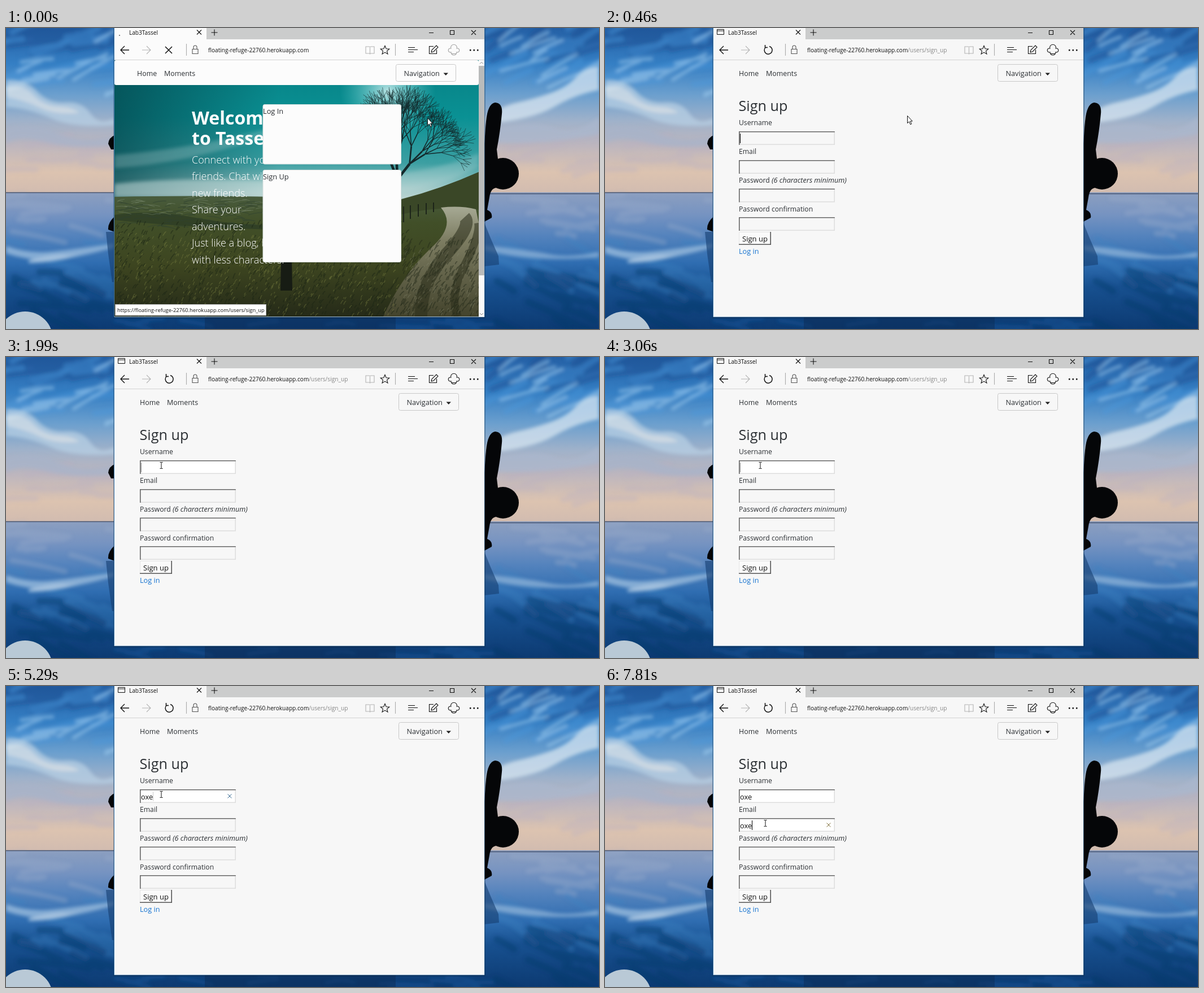
Recreate the animation shown at these times as an HTML page. Size 1050 px wide and 533 px high, loop 8 s.

```html
<!DOCTYPE html>
<html lang="en">
<head>
<meta charset="utf-8">
<title>Sign up</title>
<style>
html, body { margin: 0; width: 100%; height: 100%; overflow: hidden; }
svg { display: block; width: 100vw; height: 100vh; }
text { font-family: 'Open Sans', 'Noto Sans', sans-serif; font-size: 12.5px; fill: #2b2f33; white-space: pre; }
.line { fill: none; }
.small { font-size: 10.1px; fill: #111; }
.intro { font-size: 18.1px; font-weight: 350; fill: #fff; }
.title { font-size: 32px; font-weight: 700; fill: #fff; }
.label { font-size: 12.2px; }
.panel { font-size: 12.8px; }
.value { font-size: 12.8px; fill: #111; }
</style>
</head>
<body>
<svg viewBox="0 0 1050 533" preserveAspectRatio="none">
  <defs>
    <linearGradient id="wall" x2="0" y2="1">
      <stop offset="0" stop-color="#2560a5"/><stop offset=".12" stop-color="#357fc4"/>
      <stop offset=".22" stop-color="#6b9fce"/><stop offset=".31" stop-color="#a0b2ca"/>
      <stop offset=".39" stop-color="#bdb6be"/><stop offset=".48" stop-color="#dcc3b0"/>
      <stop offset=".545" stop-color="#d2bcb0"/><stop offset=".546" stop-color="#8c9fc0"/>
      <stop offset=".62" stop-color="#7693c1"/><stop offset=".69" stop-color="#5483bd"/>
      <stop offset=".78" stop-color="#2f6db1"/><stop offset=".86" stop-color="#17508f"/>
      <stop offset="1" stop-color="#0c3a72"/>
    </linearGradient>
    <linearGradient id="sky" x2="0" y2="1">
      <stop offset="0" stop-color="#078084"/><stop offset=".4" stop-color="#0a9194"/>
      <stop offset=".72" stop-color="#3c9fa2"/><stop offset=".9" stop-color="#a3cac9"/>
      <stop offset="1" stop-color="#c6d9d6"/>
    </linearGradient>
    <linearGradient id="shade">
      <stop offset="0" stop-color="#04454c" stop-opacity=".75"/><stop offset=".45" stop-color="#04454c" stop-opacity="0"/>
    </linearGradient>
    <radialGradient id="sun">
      <stop offset="0" stop-color="#eff" stop-opacity=".75"/><stop offset="1" stop-color="#7dd" stop-opacity="0"/>
    </radialGradient>
    <linearGradient id="land" x2="0" y2="1">
      <stop offset="0" stop-color="#5c7a72"/><stop offset=".12" stop-color="#4b5f42"/>
      <stop offset=".35" stop-color="#414f28"/><stop offset=".65" stop-color="#3d4520"/>
      <stop offset="1" stop-color="#252a18"/>
    </linearGradient>
    <linearGradient id="road" x2="0" y2="1">
      <stop offset="0" stop-color="#a6a994"/><stop offset=".3" stop-color="#7d7d62"/>
      <stop offset="1" stop-color="#43432c"/>
    </linearGradient>
    <filter id="soft" x="-20%" y="-20%" width="140%" height="140%"><feGaussianBlur stdDeviation="3"/></filter>
    <clipPath id="photo"><path d="M192 57H837V511H192Z"/></clipPath>
  </defs>

  <!-- wallpaper -->
  <path fill="url(#wall)" d="M0 0H1050V533H0Z"/>
  <g id="paint" filter="url(#soft)"></g>
  <g filter="url(#soft)" opacity=".75">
    <path fill="#b7cfe3" d="M0 92Q35 90 55 112T105 132T150 152T192 160V172Q120 178 80 160T0 140Z"/>
    <path fill="#e2e7ea" d="M0 104Q30 98 48 118T92 139T130 150Q90 155 60 141T0 122Z"/>
    <path fill="#a7b3c9" d="M0 178Q50 165 90 185T192 192V208Q120 215 70 202T0 205Z"/>
    <path fill="#9fc0df" d="M0 386Q40 400 80 396T192 382V388Q130 406 88 410T0 399Z"/>
    <path fill="#c9dcec" d="M40 412Q80 400 105 402T140 393Q120 413 40 416Z"/>
    <path fill="#d7e5f0" d="M1050 68Q1025 70 1008 88T962 116T905 132T847 160V170Q930 163 970 140T1050 110Z"/>
    <path fill="#aab7cd" d="M847 182Q930 162 970 176T1050 158V188Q960 208 847 202Z"/>
    <path fill="#8fb3d8" d="M1050 396Q1000 408 960 400T847 385V393Q930 416 1050 406Z"/>
  </g>
  <path stroke="#47556f" stroke-width="1.5" d="M0 291.5H192M847 293.5H1050"/>
  <path fill="#050608" d="M847 205L850 165Q853 134 866 132Q880 133 878 152Q875 185 869 215L872 240L868 283Q858 284 856 300L852 322Q862 326 860 336L847 343Z"/>
  <circle cx="880" cy="258" r="28" fill="#050608"/>
  <path fill="#050608" d="M192 190Q182 194 181 205L186 215H192ZM192 334Q180 345 181 357L192 361Z"/>
  <path fill="#173f70" opacity=".6" d="M847 345L858 372L872 404L873 419L847 422ZM192 361H177L181 400L188 450H192Z"/>
  <circle cx="34" cy="551" r="49" fill="#b9c9d6"/>
  <path fill="#0c2d57" opacity=".5" d="M352 512H690V533H352Z"/>

  <!-- window -->
  <path fill="#123" opacity=".3" d="M190 0H849V514H190Z"/>
  <path fill="#4680b3" d="M191 0H847.500V512H191Z"/>
  <path id="sheet" d="M192 0H847V511.500H192Z"/>
  <path fill="#cbcccc" d="M355 0H847V20H355Z"/>
  <path stroke="#d2d2d2" d="M192 56.500H847"/>
  <g class="line" stroke="#111" stroke-width="1.1">
    <path d="M338 3.500l8 8m0-8l-8 8M363.500 8h11M369 2.500v11M749 8.500h8M786.500 4.500h7v7h-7zM824 4l8 8m0-8l-8 8"/>
    <path stroke-width="1.4" d="M218 39H203m7-7l-7 7l7 7"/>
    <path stroke="#b4b4b4" d="M241 39h15m-7-7l7 7l-7 7"/>
    <path stroke="#aaa" d="M319.500 28V49M689.500 28V49"/>
    <path stroke="#555" d="M330 37.500h10v8h-10zM332 37v-3a3 3 0 0 1 6 0v3"/>
    <path stroke="#b4b4b4" d="M637 33h6q1.500 0 1.500 1.500q0-1.500 1.500-1.500h6v12h-6q-1.500 0-1.500 1.500q0-1.500-1.500-1.500h-6zM644.500 35v11"/>
    <path d="M671 31.500l2.200 5.200l5.600.4l-4.300 3.600l1.400 5.400l-4.900-3l-4.900 3l1.400-5.400l-4.300-3.600l5.600-.4z"/>
    <path d="M712 34.500h12M712 38.500h17M712 42.500h10"/>
    <path d="M757 32.500h-7.500v13h13v-7M753 43l1-4l8-8l3 3l-8 8z"/>
    <path id="share" d="M788 37a5.500 5.500 0 1 1 10 0M788 45.500h9M787 36a3.500 3.500 0 1 0 1.500 6.500M799 36a3.500 3.500 0 1 1-1.500 6.500M788 43a5 5 0 0 0 10 0"/>
  </g>
  <path fill="#111" d="M821 38h2.500v2.500H821zM827.500 38h2.500v2.500h-2.500zM834 38h2.500v2.500H834z"/>
  <text class="small" x="218" y="11.500">Lab3Tassel</text>
  <text class="small" x="358" y="42.500">floating-refuge-22760.herokuapp.com<tspan id="route" fill="#858585">/users/sign_up</tspan></text>

  <!-- landing page -->
  <g id="landing">
    <path stroke="#111" stroke-width="1.5" d="M282 33l12 12m0-12l-12 12"/>
    <g id="dots" fill="#666"></g>
    <g clip-path="url(#photo)">
      <path fill="url(#sky)" d="M192 57H837V310H192Z"/>
      <path fill="url(#shade)" d="M192 57H837V300H192Z"/>
      <g filter="url(#soft)" fill="#cfe4e1">
        <path opacity=".25" d="M192 225Q320 215 460 180V192Q320 240 192 248Z"/>
        <path opacity=".5" d="M192 276Q300 264 470 270V300H192Z"/>
        <path opacity=".25" d="M690 258Q770 250 837 222V245Q780 280 690 292Z"/>
      </g>
      <circle cx="676" cy="112" r="85" fill="url(#sun)"/>
      <path fill="url(#land)" d="M192 299Q330 296 480 299L700 303Q770 285 837 255V511H192Z"/>
      <path fill="#2c3b24" opacity=".7" d="M192 331Q260 321 330 335T470 349V357Q300 352 192 340Z"/>
      <path fill="#3a4727" d="M700 304Q770 285 837 255V322Q770 314 700 330Z"/>
      <path fill="url(#road)" d="M770 318Q805 314 832 321L837 345V511H668Q700 440 752 390Q798 350 770 318Z"/>
      <g class="line" stroke="#2a2d1a" opacity=".55">
        <path stroke-width="22" d="M812 335Q826 350 780 400T735 511"/>
        <path stroke-width="14" d="M836 345Q840 365 812 420T800 511"/>
      </g>
      <g id="grass"></g>
      <g id="tree" class="line" stroke="#14292b"></g>
      <path fill="#171c14" d="M487 410H506L507 465H486Z"/>
      <path stroke="#1c2419" stroke-width="2" d="M704 316v28M716 314v24M730 312v22M744 310v20M757 309v17"/>
    </g>
    <rect x="192" y="57" width="645" height="44" rx="3" fill="#fcfcfc"/>
    <text class="title" x="329" y="170.500">Welcome</text>
    <text class="title" x="329" y="206.500">to Tassel</text>
    <g id="intro"></g>
    <g fill="#fcfcfc" stroke="#d8e0df">
      <rect x="455" y="135.500" width="244.500" height="105.500" rx="3"/>
      <rect x="455" y="251.500" width="244.500" height="163" rx="3"/>
    </g>
    <text class="panel" x="455" y="151.500">Log In</text>
    <text class="panel" x="455" y="268">Sign Up</text>
    <path fill="#fafafa" d="M837 57H847V511.500H837Z"/>
    <path fill="#b9bbbb" d="M837 67H847V438H837Z"/>
    <path class="line" stroke="#888" d="M839 63.500l3-3l3 3M839 505l3 3l3-3"/>
    <g id="status">
      <rect x="193.500" y="489.500" width="267" height="19.500" fill="#fff" stroke="#aaa"/>
      <text style="font-size:9.35px;fill:#111" x="197" y="503">https://floating-refuge-22760.herokuapp.com/users/sign_up</text>
    </g>
  </g>

  <!-- form page -->
  <g id="form">
    <path class="line" stroke="#111" d="M198.500 2.500h12v9h-12zM198.500 5h12"/>
    <path class="line" stroke="#111" stroke-width="1.5" d="M284.500 34A7 7 0 1 0 291 32.500M283.500 30v4.500h4.500"/>
    <text style="font-size:25.2px" x="236.500" y="146.500">Sign up</text>
    <text class="label" x="237" y="172">Username</text>
    <text class="label" x="237" y="223">Email</text>
    <text class="label" x="237" y="273.500">Password</text>
    <text style="font-size:12.6px;font-style:italic" x="295" y="273.500">(6 characters minimum)</text>
    <text class="label" x="237" y="324.500">Password confirmation</text>
    <g id="fields"></g>
    <path fill="#fafafa" d="M237 361H294V384H237Z"/>
    <path class="line" stroke="#e6e6e6" d="M237.500 384V361.500H293"/>
    <path class="line" stroke="#555" stroke-width="1.6" d="M237 383.200H293.200V361"/>
    <text style="font-size:13px;fill:#111" x="243" y="378">Sign up</text>
    <text style="font-size:12.7px;fill:#1673d0" x="237" y="400">Log in</text>
    <path id="clear" d="M-3.500-3.500l7 7m0-7l-7 7"/>
    <path id="caret" stroke="#000" d="M.5 0v17"/>
  </g>

  <g id="menu">
    <text style="font-size:12.4px" x="232" y="84.500">Home</text>
    <text style="font-size:12.4px" x="280" y="84.500">Moments</text>
    <rect x="690.500" y="64.500" width="106" height="30" rx="3" fill="none" stroke="#c8c8c8"/>
    <text style="font-size:12.7px" x="704.500" y="85">Navigation</text>
    <path fill="#222" d="M774.500 79.500h8.500l-4.250 4.500z"/>
  </g>
  <path id="arrow" fill="#fff" stroke="#111" d="M.5.5V13.500L3.500 10.800L5.700 15.800L7.800 14.900L5.600 10H9.300Z"/>
  <path id="beam" class="line" stroke="#111" d="M-2.500-5.500h2l.5.500l.500-.5h2M0-5v10M-2.500 5.500h2l.5-.5l.5.500h2"/>
</svg>
<script>
const $ = id => document.getElementById(id);
const LOOP = 8000, USER = 'oxe';
let seed = 7;
const rnd = () => (seed = seed * 16807 % 2147483647) / 2147483647;

// Scatter short brush strokes of one colour over a box
function strokes(id, color, n, [x, y, w, h], len, angle, width, opacity) {
  let d = '';
  while (n--) {
    const a = angle + (rnd() - .5) * .5, l = len * (.4 + rnd());
    d += `M${x + rnd() * w} ${y + rnd() * h}q${l * .5 * Math.cos(a)} ${l * .5 * Math.sin(a) - 2} ${l * Math.cos(a)} ${l * Math.sin(a)}`;
  }
  $(id).innerHTML += `<path d="${d}" fill="none" stroke="${color}" stroke-width="${width}" stroke-linecap="round" opacity="${opacity}"/>`;
}

for (const [x, tilt] of [[-20, -.3], [835, -.45]]) {
  const band = (color, n, y, h, angle, width, opacity) =>
    strokes('paint', color, n, [x, y, 200, h], 70, angle, width, opacity);
  band('#174a8c', 14, 0, 60, tilt, 11, .4);
  band('#4c98dc', 16, 0, 110, tilt, 10, .4);
  band('#a5d0f0', 12, 20, 100, tilt, 6, .5);
  band('#b9b3bf', 10, 190, 80, -.1, 10, .35);
  band('#9aabcb', 10, 300, 65, .05, 9, .35);
  band('#3b82c4', 12, 370, 90, -tilt, 10, .35);
  band('#0b3569', 14, 430, 100, -tilt, 12, .4);
}
strokes('paint', '#1d63a8', 20, [190, 512, 660, 21], 45, .1, 6, .4);

strokes('grass', '#1b2515', 700, [192, 345, 520, 165], 7, -1, 1.6, .5);
strokes('grass', '#7b8040', 600, [192, 365, 500, 146], 5, -1, 1.1, .5);
strokes('grass', '#2f4130', 110, [192, 308, 280, 45], 20, 0, 1.4, .5);
strokes('grass', '#8a9a80', 60, [192, 303, 280, 28], 18, 0, 1, .4);
strokes('grass', '#1f2717', 260, [700, 380, 137, 130], 9, -1, 1.8, .45);
strokes('grass', '#8b8c73', 120, [700, 390, 137, 120], 6, -1, 1.2, .35);

// Bare tree, one path per branching level
const LEVELS = 7, levels = Array(LEVELS).fill('');
function branch(x, y, a, len, level) {
  const x2 = x + len * Math.cos(a), y2 = y + len * Math.sin(a);
  levels[level] += `M${x} ${y}L${x2} ${y2}`;
  if (level < LEVELS - 1) for (const side of [-1, 0, 1])
    branch(x2, y2, a + side * .42 + (rnd() - .5) * .35, len * (.68 + rnd() * .24), level + 1);
}
branch(690, 312, -1.5, 44, 0);
$('tree').innerHTML = levels.map((d, i) => `<path d="${d}" stroke-width="${Math.max(.6, 8 * .58 ** i)}"/>`).join('');

$('intro').innerHTML = ['Connect with your', 'friends. Chat with', 'new friends.', 'Share your', 'adventures.',
  'Just like a blog, but', 'with less characters.']
  .map((s, i) => `<text class="intro" x="329" y="${240 + i * 29.45}">${s}</text>`).join('');

const fieldY = [183, 234, 284.5, 335];
$('fields').innerHTML = fieldY.map((y, i) => `<path id="box${i}" d="M237 ${y}h170v24h-170z"/>
  <path class="line" stroke="#dedede" stroke-width="1.6" d="M238 ${y + 23.2}h168.200v-23"/>
  <path class="line" stroke="#666" stroke-width="1.6" d="M237.800 ${y + 24}v-23.200h169"/>
  <text id="value${i}" class="value" x="239" y="${y + 17.5}"></text>`).join('');

// Step tracks: [time, ...values]
const pointer = [[0, 746, 159], [160, 712, 156], [310, 663, 153], [460, 535, 155], [610, 500, 175], [760, 440, 192],
  [910, 330, 194], [1010, 288, 193], [1160, 276, 193], [1280, 275, 192], [6560, 279, 214], [6720, 283, 240], [6900, 284, 243]];
const blink = [[0, 1], [910, .4], [1010, 0], [1430, .5], [1580, 1], [1990, .4], [2140, 0], [2540, .5], [2690, 1],
  [3060, .4], [3180, .15], [3300, 0], [3580, .5], [3730, 1], [4840, .4], [4990, 0], [5290, .2], [5420, .6], [5560, 1],
  [5870, .4], [5990, 0], [6410, .5], [6560, 1], [7270, .4], [7400, 1]];
const typed = [[[0, 0], [4030, 1], [4220, 2], [4410, 3]], [[0, 0], [7400, 1], [7540, 2], [7680, 3]]];
const at = (track, t) => track.filter(k => k[0] <= t).pop();
const show = (id, on) => $(id).style.display = on ? '' : 'none';
const move = (id, x, y) => $(id).setAttribute('transform', `translate(${x} ${y})`);

function draw(t) {
  const loaded = t >= 460, focus = t < 6900 ? 0 : 1;
  show('landing', !loaded);
  show('form', loaded);
  show('status', t < 160);
  show('route', t >= 310);
  $('sheet').style.fill = loaded ? '#f7f7f7' : '#fbfbfb';
  $('share').style.stroke = loaded ? '' : '#a0a0a0';
  move('menu', loaded ? 5 : 0, 0);
  $('dots').innerHTML = (t < 160 ? [[201, 13]] : [[198, 5], [198, 11], [204, 14]])
    .map(([x, y]) => `<circle cx="${x}" cy="${y}" r="1.1"/>`).join('');

  typed.forEach((track, i) => $('value' + i).textContent = USER.slice(0, at(track, t)[1]));
  fieldY.forEach((y, i) => $('box' + i).style.fill =
    i === 0 && t >= 910 || i === 1 && t >= 6720 ? '#fff' : '#f7f7f7');
  const value = $('value' + focus);
  show('clear', value.textContent);
  move('clear', 396, fieldY[focus] + 12);
  $('clear').style.stroke = focus ? '#80703c' : '#35678f';
  move('caret', 239 + (loaded && value.textContent ? Math.round(value.getComputedTextLength()) : 0), fieldY[focus] + 4);
  $('caret').style.opacity = at(blink, t)[1];

  const [, x, y] = at(pointer, t);
  const inField = loaded && x < 407 && (y < 207 || y > 234);
  show('arrow', !inField);
  show('beam', inField);
  move(inField ? 'beam' : 'arrow', x, y);
}

const start = performance.now();
(function tick() {
  draw((performance.now() - start) % LOOP);
  requestAnimationFrame(tick);
})();
</script>
</body>
</html>
```
